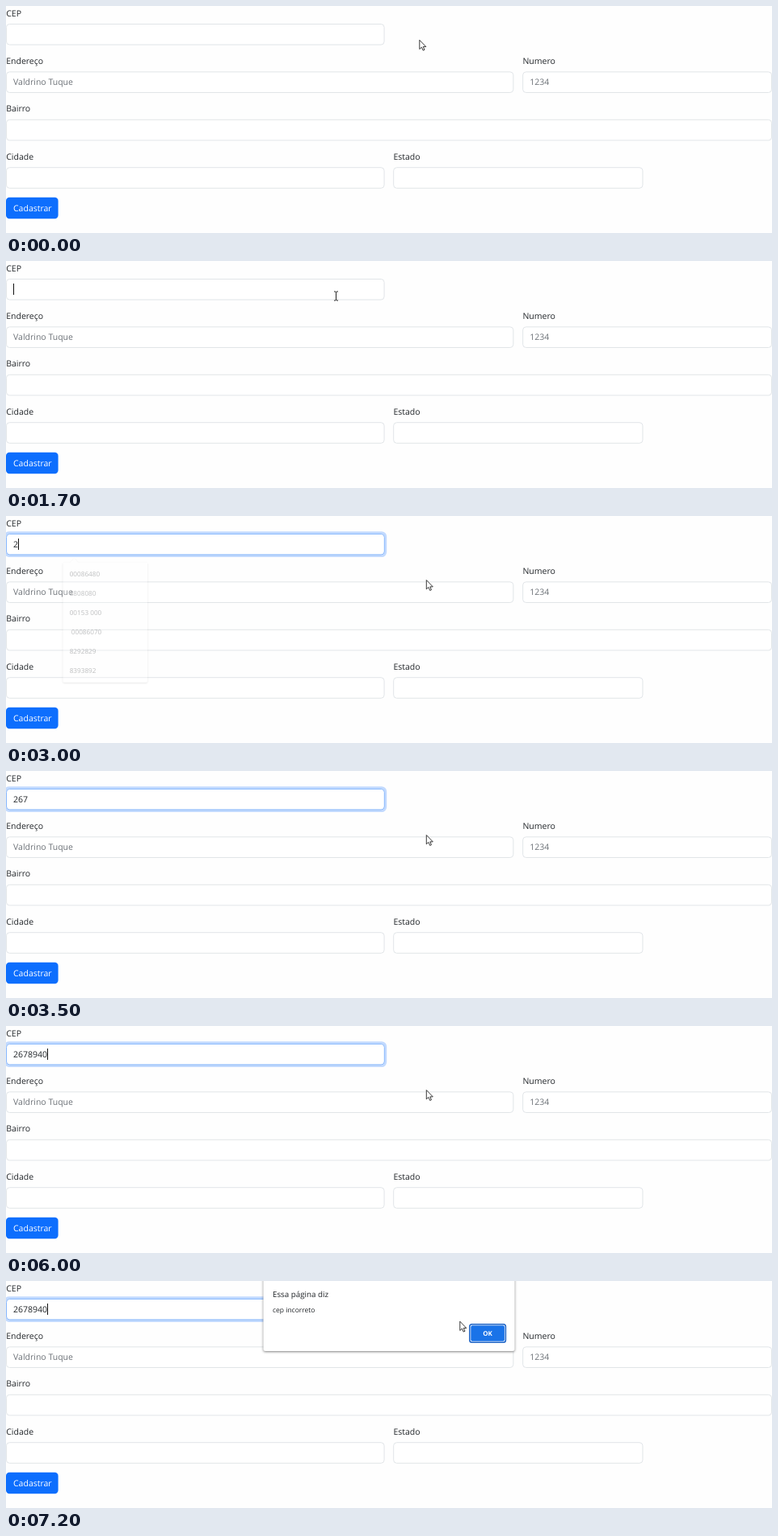
An HTML page for the animation above (8000 ms loop, 948 by 282 pixels).

```html
<!DOCTYPE html>
<html lang="pt-BR">
<head>
<meta charset="utf-8">
<title>Cadastro</title>
<style>
  html, body { margin: 0; width: 100%; height: 100%; overflow: hidden; background: #fefefe; }
  svg { display: block; }
  text {
    font: 10.5px "Open Sans", "Noto Sans", sans-serif;
    fill: #212529;
    white-space: pre;
    text-rendering: geometricPrecision;
  }
  .box { fill: #fff; stroke: #dee2e6; stroke-width: .9; }
  .hint { fill: #6c7177; }
  .small { font-size: 8.5px; }
  #popup { filter: drop-shadow(0 1px 1px rgba(0, 0, 0, .35)); }
  #sheet { filter: drop-shadow(0 1px 1.4px rgba(0, 0, 0, .5)); }
</style>
</head>
<body>
<svg width="948" height="282" viewBox="0 0 948 282">
  <rect width="948" height="282" fill="#fefefe"/>
  <g id="form"></g>
  <g id="focus">
    <rect x="-1" y="20.6" width="470.8" height="29" rx="5" fill="none" stroke="#0d6efd" stroke-opacity=".25" stroke-width="2.8"/>
    <rect x=".5" y="22.4" width="467.8" height="25.6" rx="4" fill="#fff" stroke="#86b7fe"/>
  </g>
  <text id="typed" x="9" y="39"></text>
  <rect id="caret" y="28" width="1" height="14" fill="#111"/>
  <g id="list">
    <path id="popup" fill="#fff" d="M70 55H78L83 49.5L88 55H175.5Q177 55 177 56.5V208Q177 209.5 175.5 209.5H70Q68.500 209.500 68.500 208V56.500Q68.500 55 70 55Z"/>
  </g>
  <g id="dialog">
    <rect id="sheet" x="318.500" y="-8" width="311" height="95" rx="2.500" fill="#fff"/>
    <text x="330" y="20" style="font-size:9.8px">Essa página diz</text>
    <text class="small" x="330" y="39.300">cep incorreto</text>
    <rect x="573.800" y="53.800" width="44.600" height="22.400" rx="2.800" fill="#fff" stroke="#1a62c6" stroke-width="1.500"/>
    <rect x="575.300" y="55.300" width="41.600" height="19.400" rx="1.800" fill="#1a73e8"/>
    <text x="596" y="67.900" text-anchor="middle" style="font-size:8px;font-weight:700;fill:#fff">OK</text>
  </g>
  <path id="arrow" d="M0 0V11.300L2.600 8.900L4.400 12.900L6.200 12.100L4.500 8.300H8Z" fill="#fff" stroke="#222" stroke-width=".9" stroke-linejoin="round"/>
  <path id="beam" d="M-2.500 -5.500H-.6L0 -5L.6 -5.500H2.500M0 -5V5M-2.500 5.500H-.6L0 5L.6 5.500H2.500" fill="none" stroke="#222"/>
</svg>
<script>
const LOOP = 8000, TICK = 100, ROW = 59.4;
const $ = id => document.getElementById(id);

function add(parent, tag, attrs, text = '') {
  const node = document.createElementNS('http://www.w3.org/2000/svg', tag);
  for (const key in attrs) node.setAttribute(key, attrs[key]);
  node.textContent = text;
  parent.append(node);
}

// label, row, left, width, placeholder
const fields = [
  ['CEP', 0, 0, 468.5, ''],
  ['Endereço', 1, 0, 628.3, 'Valdrino Tuque'],
  ['Numero', 1, 639.2, 308.8, '1234'],
  ['Bairro', 2, 0, 948, ''],
  ['Cidade', 3, 0, 468.5, ''],
  ['Estado', 3, 479.2, 309.2, '']
];
for (const [label, row, x, width, hint] of fields) {
  const y = row * ROW;
  add($('form'), 'text', { x: x + .2, y: 12.5 + y }, label);
  add($('form'), 'rect', { class: 'box', x: x + .45, y: 22.5 + y, width: width - .9, height: 25.6, rx: 4 });
  add($('form'), 'text', { class: 'hint', x: x + 9, y: 39 + y }, hint);
}
add($('form'), 'rect', { y: 237.8, width: 64.6, height: 26.4, rx: 4.2, fill: '#0d6efd' });
add($('form'), 'text', { x: 9, y: 255, style: 'fill:#fff' }, 'Cadastrar');

['00086480', '8808080', '00153 000', ' 00086070', '8292829', '8393892'].forEach((code, i) =>
  add($('list'), 'text', { class: 'small', x: 77, y: 73.1 + i * 24.9 }, code));

// Each track lists [start time, values...]; a value holds until the next entry.
const pointer = [
  [0, 511.8, 42.3, 'arrow'], [500, 510, 42.3, 'arrow'],
  [900, 506, 43, 'arrow'], [1000, 490, 44, 'arrow'], [1100, 462, 45, 'beam'],
  [1200, 434, 45, 'beam'], [1300, 415, 44, 'beam'], [1400, 408.5, 43.5, 'beam'],
  [2300, 428, 51, 'arrow'], [2400, 496, 72, 'arrow'], [2500, 520.3, 79.6, 'arrow'],
  [6300, 520.9, 79.6, 'arrow'], [6500, 526, 76, 'arrow'], [6600, 541, 65, 'arrow'],
  [6700, 556, 54, 'arrow'], [6800, 561.8, 50.2, 'arrow']
];
const typing = [[0, ''], [2800, '2'], [3100, '267'], [4100, '26789'], [5100, '267894'], [5600, '2678940']];
const blink = [
  [0, 0], [1700, 1], [2100, 0], [2500, 1], [3500, 0], [4100, 1],
  [4500, 0], [5000, 1], [6100, 0], [6600, 1]
];
const at = (track, t) => track.findLast(entry => entry[0] <= t).slice(1);
const ramp = (t, start, end) => Math.min(1, Math.max(0, (t - start) / (end - start)));

function draw(time) {
  const t = Math.floor(time % LOOP / TICK) * TICK;

  const [x, y, shape] = at(pointer, t);
  for (const id of ['arrow', 'beam']) {
    $(id).setAttribute('transform', `translate(${x} ${y})`);
    $(id).setAttribute('visibility', id === shape ? 'visible' : 'hidden');
  }

  const [value] = at(typing, t);
  $('typed').textContent = value;
  $('caret').setAttribute('x', 9 + value.length * 6);
  $('caret').setAttribute('opacity', at(blink, t)[0]);
  $('focus').setAttribute('opacity', ramp(t, 1700, 1900));

  const shown = ramp(t, 1800, 2100) * (1 - ramp(t, 2800, 3080));
  const scale = .95 + .05 * shown;
  $('list').setAttribute('opacity', shown);
  $('list').setAttribute('transform', `translate(122.7 132.3) scale(${scale}) translate(-122.7 -132.3)`);

  $('dialog').setAttribute('opacity', ramp(t, 6900, 7200));
}

const began = performance.now();
function frame() {
  draw(performance.now() - began);
  requestAnimationFrame(frame);
}
frame();
</script>
</body>
</html>
```
